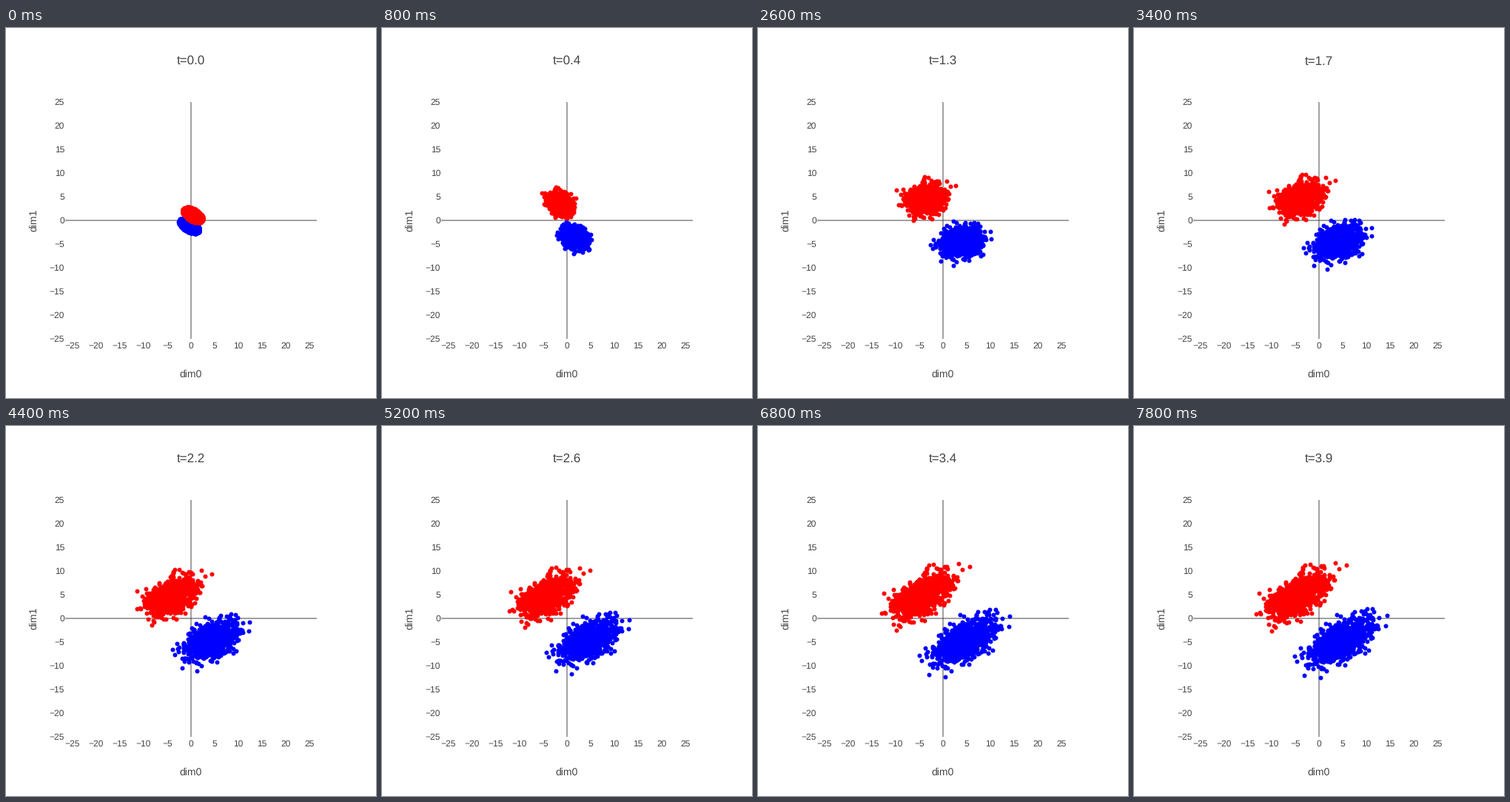
A matplotlib script for the animation above (8000 ms loop, 500 px wide and 500 px high).

```python
import numpy as np
import matplotlib.pyplot as plt
from matplotlib.animation import FuncAnimation

PX = 0.72                    # points per pixel at 100 dpi
SCALE = 6.4                  # pixels per data unit
ORIGIN = np.array([250, 260])
INK = "#444444"
START, END = 0.8, 3.9        # end of the initial burst, last time shown
FRAMES, COUNT = 40, 1000

# the red cloud; the blue one is its point reflection
CENTER = np.array([-4.35, 4.9])
SPREAD = np.linalg.cholesky([[9.0, 3.9], [3.9, 5.2]])
SQUEEZE = np.array([[0.37, 0.26], [0.26, 0.34]])
SHIFT = np.array([0.6, 0.1])

# packed ellipse at t = 0: axes as rows, half lengths, middle
AXES = np.array([[0.86, -0.51], [0.51, 0.86]])
HALF = np.array([2.45, 1.3])
MIDDLE = np.array([0.385, 1.155])

plt.rcParams["text.hinting"] = "none"
plt.rcParams["font.family"] = "Liberation Sans"


def spread_out(points, t, side):
    """Slow shear that takes the cloud to its final shape."""
    g = ((END - t) / (END - START)) ** 1.8
    return points @ (np.eye(2) - g * SQUEEZE) + side * g * SHIFT


class Cloud:
    def __init__(self, side, seed):
        rng = np.random.default_rng(seed)
        # normal distribution without its farthest outliers
        r = np.sqrt(-2 * np.log(1 - 0.9985 * rng.random(COUNT)))
        a = rng.uniform(0, 2 * np.pi, COUNT)
        white = r[:, None] * np.c_[np.cos(a), np.sin(a)]
        self.side = side
        self.final = side * CENTER + white @ SPREAD.T
        self.burst = spread_out(self.final, START, side)

        # same directions, evenly filling the small ellipse
        d = (self.burst - spread_out(side * CENTER, START, side)) @ AXES.T
        d /= np.linalg.norm(d, axis=1, keepdims=True)
        fill = np.sqrt(1 - np.exp(-r ** 2 / 2))[:, None]
        self.packed = side * MIDDLE + (d * fill * HALF) @ AXES

    def at(self, t):
        if t < START:
            s = t / START
            ease = np.array([s, 1 - (1 - s) ** 2])
            pos = self.packed + (self.burst - self.packed) * ease
        else:
            pos = spread_out(self.final, t, self.side)
        return ORIGIN + pos * [SCALE, -SCALE]


def label(x, y, text, size, ha="center", va="baseline", **kw):
    return ax.text(x, y, text, fontsize=size * PX, color=INK,
                   ha=ha, va=va, **kw)


fig = plt.figure(figsize=(5, 5), dpi=100, facecolor="white")
ax = fig.add_axes([0, 0, 1, 1])
ax.set(xlim=(0, 500), ylim=(500, 0))
ax.axis("off")

for xs, ys in (((80, 420), (260, 260)), ((250, 250), (100, 420))):
    ax.plot(xs, ys, color=INK, lw=PX, snap=False, solid_capstyle="butt",
            zorder=1)

for v in range(-25, 26, 5):
    tick = str(v).replace("-", "\u2212")
    label(250 + v * SCALE, 433, tick, 12)
    label(79, 264 - v * SCALE, tick, 12, ha="right")

label(250, 472, "dim0", 14)
label(38, 260, "dim1", 14, va="center", rotation=90)
title = label(250, 50, "t=0.0", 17)

clouds = [Cloud(-1, 4), Cloud(1, 9)]
dots = [ax.scatter(*cloud.at(0).T, s=(6 * PX) ** 2, c=color, linewidths=0,
                   zorder=2)
        for cloud, color in zip(clouds, ("#0000ff", "#ff0000"))]


def update(k):
    t = k / 10
    title.set_text(f"t={t:.1f}")
    for cloud, dot in zip(clouds, dots):
        dot.set_offsets(cloud.at(t))
    return [title, *dots]


anim = FuncAnimation(fig, update, frames=FRAMES, interval=200, repeat=True,
                     repeat_delay=0, blit=False)
plt.show()
```
